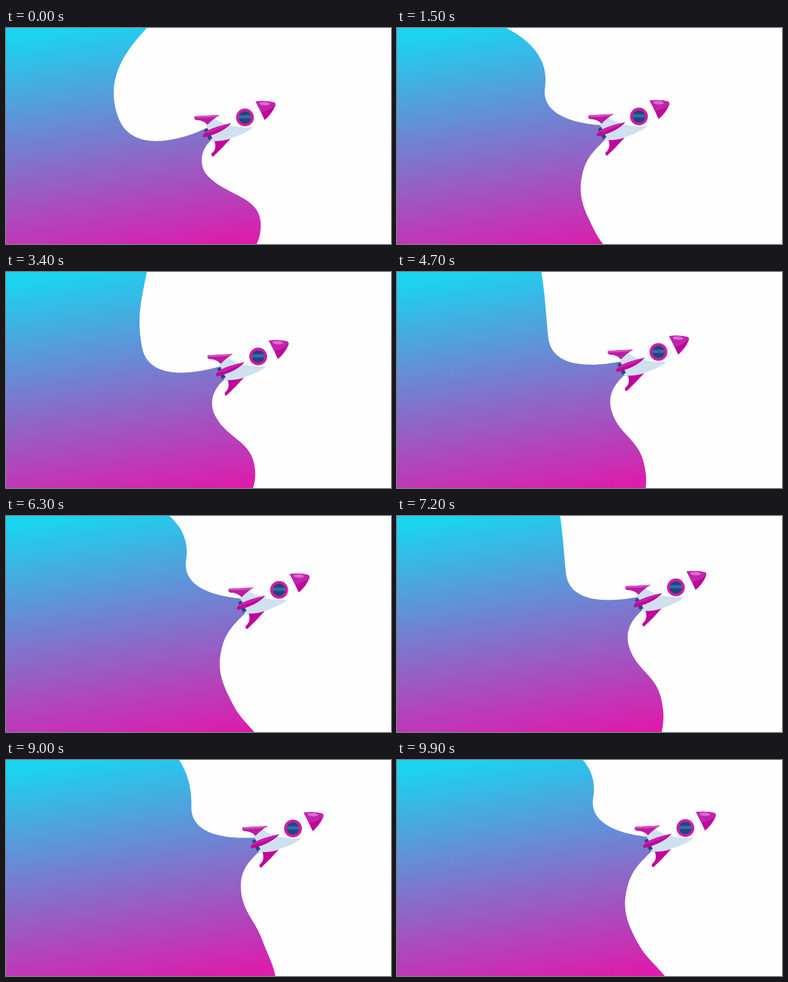
Recreate the animation shown at these times as an HTML page. Size 600 by 338 pixels, loop 10 s.

```html
<!DOCTYPE html>
<html lang="en">
<head>
<meta charset="utf-8">
<title>Rocket wave</title>
<style>
  html, body { margin: 0; width: 100%; height: 100%; overflow: hidden; background: #fefefe; }
  svg { display: block; width: 100vw; height: 100vh; }
</style>
</head>
<body>
<svg viewBox="0 0 600 338" preserveAspectRatio="none">
  <defs>
    <linearGradient id="sky" gradientUnits="userSpaceOnUse" x1="178" y1="-12" x2="238" y2="358">
      <stop offset="0" stop-color="#1ad4f0"/>
      <stop offset="1" stop-color="#de1bac"/>
    </linearGradient>
    <clipPath id="glass"><circle r="9.8"/></clipPath>
  </defs>
  <path id="wave" fill="url(#sky)"/>
  <g id="rocket">
    <path fill="#cfe0ef" d="M312 153Q317 144 323 140Q344 157 386 155.500Q358 175 320 178Z"/>
    <rect x="312" y="157" width="6" height="18" fill="#234a85" transform="rotate(-26 315 166)"/>
    <g fill="#bf069b">
      <path fill="#bd1aa5" d="M294 138Q292 142 296 144Q308 144 314 151.500Q322 143 333 136Z"/>
      <path fill="#d650c0" d="M294 138L333 136L328 139Q310 141 293 140.500Z"/>
      <path d="M325 177Q329 190 320.500 196Q319 201 323 201Q338 187 350 173Q338 177 325 177Z"/>
      <path d="M306.500 168Q312 157 351 149Q338 164 309 171Q306 171 306.500 168Z"/>
      <path fill="#c922ab" d="M308 165Q318 156 351 149Q332 160 308 166Z"/>
      <path d="M389 115Q405 113 418 116.500Q420.500 118 419.500 122Q414 135 403 144Q397 130 389 115Z"/>
      <path fill="#c026aa" d="M389 115Q405 113 418 116.500Q420.500 118 419.500 121Q408 131 397 131Z"/>
    </g>
    <ellipse cx="403" cy="118.300" rx="8.300" ry="2.700" fill="#de66d8" transform="rotate(3 403 118)"/>
    <g transform="translate(372.400 140)">
      <circle r="13.900" fill="#d41ba4"/>
      <circle r="9.800" fill="#1e477d"/>
      <rect x="-11" y="-3.500" width="22" height="5" fill="#386aa6" clip-path="url(#glass)"/>
    </g>
  </g>
</svg>
<script>
  const LOOP = 10000, STEP = 100, SWING = 2000;
  const HANDLE = 0.4; // length of a curve handle as a share of its chord
  const wave = document.getElementById('wave');
  const rocket = document.getElementById('rocket');

  // A key point sways between two poses; each pose is x, y and heading in degrees.
  const key = (hollow, bulge) => ({ hollow, bulge });
  const upperEdge = [
    key([234, -15, 135], [130, -12, 15]),
    key([175, 140, 70], [229, 92, 100]),
    key([320, 153, -27], [320, 154, 4])
  ];
  const lowerEdge = [
    key([322, 174, 144], [322, 174, 135]),
    key([315, 232, 46], [282, 232, 105]),
    key([397, 308, 90], [297, 318, 62]),
    key([358, 370, 150], [340, 371, 50])
  ];

  const smooth = p => p * p * (3 - 2 * p);
  const quad = p => p < 0.5 ? 2 * p * p : 1 - 2 * (1 - p) ** 2;

  // Eases from 0 to 1 and back; the rise is a little quicker than the fall.
  function sway(ms) {
    const phase = ms / SWING % 2;
    const rising = phase < 1;
    const u = rising ? phase : 2 - phase;
    const gone = u ** 1.7;
    const left = ((rising ? 0.57 : 0.7) * (1 - u)) ** 1.7;
    return gone / (gone + left);
  }

  const pose = (edge, mix) => edge.map(({ hollow, bulge }) => {
    const [x, y, deg] = hollow.map((v, i) => v + (bulge[i] - v) * mix);
    return { x, y, angle: deg * Math.PI / 180 };
  });

  const ahead = (p, length) => [
    p.x + length * Math.cos(p.angle),
    p.y + length * Math.sin(p.angle)
  ];

  // Joins points with curves that leave and arrive along their headings.
  function trace(points) {
    let path = `L${points[0].x} ${points[0].y}`;
    for (let i = 1; i < points.length; i++) {
      const a = points[i - 1], b = points[i];
      const reach = HANDLE * Math.hypot(b.x - a.x, b.y - a.y);
      path += `C${ahead(a, reach)} ${ahead(b, -reach)} ${b.x} ${b.y}`;
    }
    return path;
  }

  function draw(ms) {
    const t = Math.floor(ms % LOOP / STEP) * STEP;
    const mix = sway(t);
    const shift = `translate(${77 * smooth(t / LOOP)} ${-33.5 * quad(t / LOOP)})`;
    rocket.setAttribute('transform', shift);
    // The gradient stays on the stage, so the path itself is moved.
    const dx = 77 * smooth(t / LOOP), dy = -33.5 * quad(t / LOOP);
    const moved = edge => pose(edge, mix).map(p => ({ ...p, x: p.x + dx, y: p.y + dy }));
    wave.setAttribute('d',
      'M-20 -60' + trace(moved(upperEdge)) + trace(moved(lowerEdge)) + 'V400H-20Z');
  }

  const start = performance.now();
  function tick() {
    draw(performance.now() - start);
    requestAnimationFrame(tick);
  }
  tick();
</script>
</body>
</html>
```
